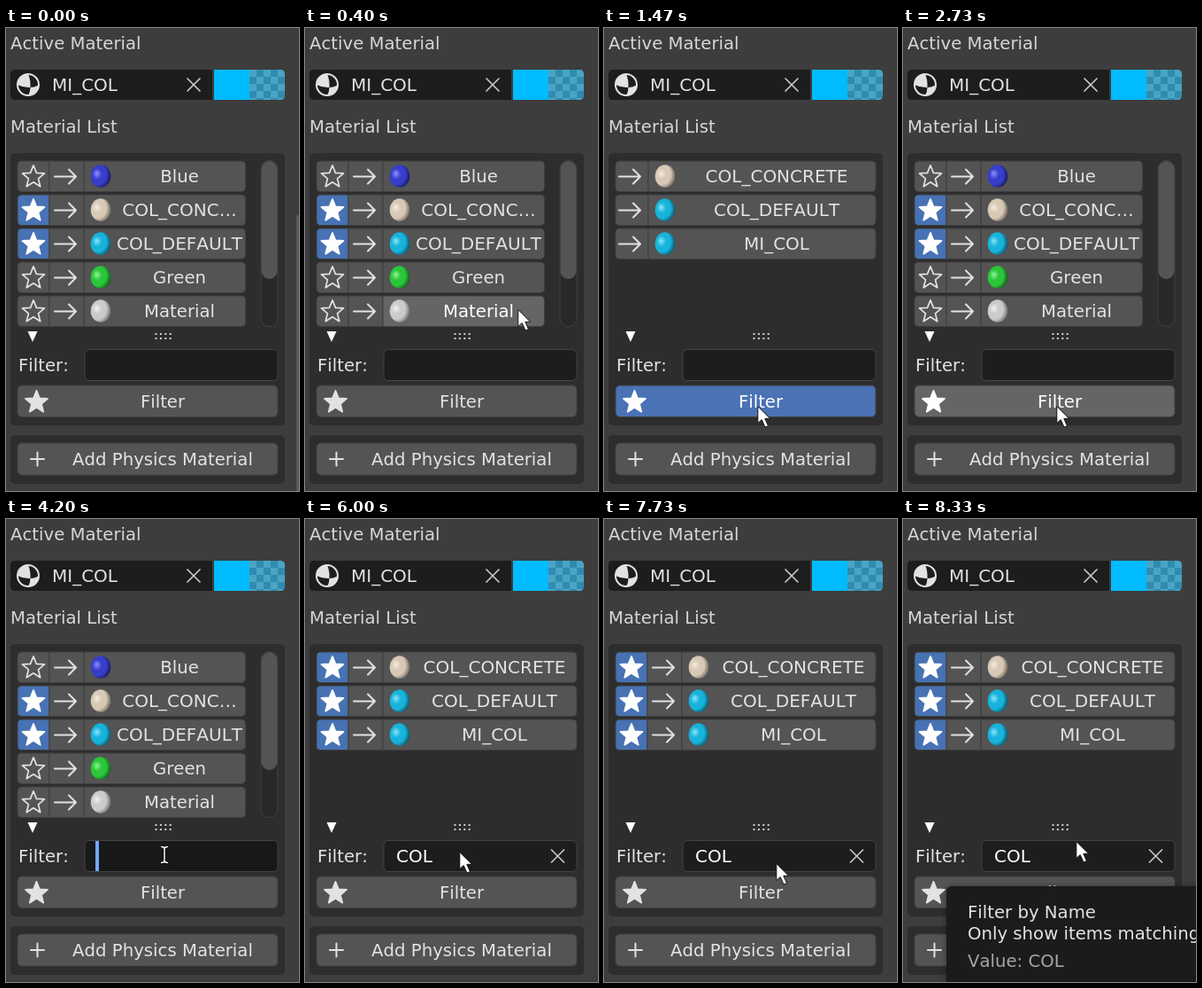
An HTML page that plays this animation: 331 px wide and 522 px high, repeating every 8.94 s.

```html
<!DOCTYPE html>
<html lang="en">
<head>
<meta charset="utf-8">
<title>Material list filter</title>
<style>
  html, body { margin: 0; width: 100%; height: 100%; overflow: hidden; background: #3d3d3d; }
  svg { display: block; width: 331px; height: 522px; }
  text { font-family: "DejaVu Sans", sans-serif; font-size: 19.7px; font-kerning: none; white-space: pre; }
  .caps { font-size: 20px; }
  .mid { text-anchor: middle; }
  .line { fill: none; stroke: #e2e2e2; stroke-width: 2; stroke-linecap: round; stroke-linejoin: round; }
</style>
</head>
<body>
<svg id="stage" viewBox="0 0 331 522"></svg>
<script>
const LOOP = 8940, FPS = 15;
const BUTTON = '#545454', HOVER = '#656565', BLUE = '#4772b3', FIELD = '#1d1d1d', PANEL = '#2d2d2d';
const EDGE = 'stroke="#3f3f3f"';

// name: highlight, body, shade
const balls = {
  blue: ['#8c92ff', '#383dcb', '#14164f'],
  cream: ['#f6ecdf', '#d8c9b6', '#675e53'],
  cyan: ['#8ae6fb', '#17b3da', '#0a4a5e'],
  green: ['#91f49a', '#2bc63a', '#0e5017'],
  grey: ['#f2f2f2', '#cbcbcb', '#636363']
};
const full = [
  ['Blue', 'blue'], ['COL_CONC…', 'cream', 1], ['COL_DEFAULT', 'cyan', 1],
  ['Green', 'green'], ['Material', 'grey']
];
const found = [['COL_CONCRETE', 'cream', 1], ['COL_DEFAULT', 'cyan', 1], ['MI_COL', 'cyan', 1]];

// pointer path: tick, x, y
const path = [
  [3, 318, 262], [4, 290, 285], [6, 240, 317], [8, 222, 345], [11, 198, 391], [13, 182, 414],
  [16, 173, 426], [50, 173, 426], [53, 173, 402], [55, 173, 402], [59, 174, 375],
  [101, 174, 375], [104, 178, 414], [106, 181, 434], [108, 184, 416], [110, 187, 388],
  [111, 188, 374], [112, 189, 380], [114, 191, 412], [115, 192, 420], [116, 194, 388], [117, 195, 363]
];

const rect = (x, y, w, h, fill, r = 0, extra = '') =>
  `<rect x="${x}" y="${y}" width="${w}" height="${h}" rx="${r}" fill="${fill}" ${extra}/>`;
const line = (d, extra = '') => `<path class="line" d="${d}" ${extra}/>`;
const shape = (d, fill, extra = '') => `<path d="${d}" fill="${fill}" ${extra}/>`;

function label(s, x, y, mid, fill = '#e2e2e2') {
  const caps = s === s.toUpperCase() ? 'caps' : '';
  return `<text class="${caps} ${mid ? 'mid' : ''}" x="${x}" y="${y}" fill="${fill}">${s}</text>`;
}

// Button part with rounding only on the chosen ends
function part(x, y, w, h, fill, left, right, extra = '') {
  const a = left ? 5 : 0, b = right ? 5 : 0;
  return shape(`M${x + a} ${y}H${x + w - b}q${b} 0 ${b} ${b}V${y + h - b}q0 ${b} ${-b} ${b}` +
    `H${x + a}q${-a} 0 ${-a} ${-a}V${y + a}q0 ${-a} ${a} ${-a}Z`, fill, extra);
}

function star(cx, cy, solid, fill = '#e2e2e2') {
  let d = '';
  for (let i = 0; i < 10; i++) {
    const r = i % 2 ? 5.8 : 13.2, a = i * Math.PI / 5 - Math.PI / 2;
    d += `${i ? 'L' : 'M'}${(cx + r * Math.cos(a)).toFixed(2)} ${(cy + 1 + r * Math.sin(a)).toFixed(2)}`;
  }
  return line(d + 'Z', `style="fill:${solid ? fill : 'none'};stroke:${fill};stroke-width:1.7"`);
}

const arrow = (cx, cy) => line(`M${cx - 12} ${cy}h24m-8 -8l8 8l-8 8`, 'stroke-width="1.8"');
const cross = (cx, cy) => line(`M${cx - 7} ${cy - 7}l14 14m0 -14l-14 14`, 'style="stroke:#c8c8c8;stroke-width:1.7"');
const ball = (cx, cy, c) => `<ellipse cx="${cx}" cy="${cy}" rx="11.3" ry="12.8" fill="url(#${c})"/>`;

const defs = '<defs>' + Object.entries(balls).map(([id, c]) =>
  `<radialGradient id="${id}" cx=".36" cy=".45" r=".68" fx=".3" fy=".38">` +
  [0, .35, .65, 1].map((o, i) => `<stop offset="${o}" stop-color="${c[[0, 1, 1, 2][i]]}"/>`).join('') +
  '</radialGradient>').join('') +
  '<pattern id="check" x="275" y="47" width="16" height="16" patternUnits="userSpaceOnUse">' +
  rect(0, 0, 16, 16, '#2f8cb0') + rect(0, 0, 8, 8, '#4ba4c4') + rect(8, 8, 8, 8, '#4ba4c4') +
  '</pattern><filter id="soft"><feGaussianBlur stdDeviation="3"/></filter></defs>';

function backdrop() {
  let dots = '';
  for (let i = 0; i < 8; i++) dots += rect(168.5 + i % 4 * 5.4, i < 4 ? 344 : 349, 2, 2, '#d0d0d0');
  return defs + rect(0, 0, 331, 522, '#3d3d3d') +
    label('Active Material', 5, 24, 0, '#d6d6d6') +
    part(5, 47, 228, 34, FIELD, 1, 0) +
    shape('M13 64Q20 67.5 27.5 67Q28 58 25 52A12 12 0 0 0 13 64ZM37 64Q33 67 27.5 67Q27.5 72 25 76A12 12 0 0 0 37 64Z', '#e2e2e2') +
    '<circle class="line" cx="25" cy="64" r="12"/>' +
    label('MI_COL', 52, 71) + cross(212, 64) +
    rect(235, 47, 40.5, 34, '#00bbff') + part(275, 47, 40, 34, 'url(#check)', 0, 1) +
    label('Material List', 5, 118, 0, '#d6d6d6') +
    rect(5, 141, 310, 307, PANEL, 5) + rect(5, 459, 310, 55, PANEL, 5) +
    shape('M24.5 342h11l-5.5 12Z', '#fff') + dots +
    label('Filter:', 14, 387) +
    rect(13, 468, 294, 36, BUTTON, 5, EDGE) + line('M28 486h15m-7.5 -7.5v15') +
    label('Add Physics Material', 177, 493, 1);
}

function list(rows, stars, right, p) {
  const x = stars ? 88 : 50, mid = stars ? (right < 300 ? 196 : 214) : 195;
  return rows.map(([name, color, fav], i) => {
    const y = 150 + i * 38, cy = y + 17;
    const over = p && p.x >= x && p.x <= right && p.y >= y && p.y < y + 35;
    const head = stars ? part(13, y, 36, 34.5, fav ? BLUE : BUTTON, 1, 0, EDGE) +
      star(31, cy, fav, fav ? '#fff' : '#e2e2e2') : '';
    const go = stars ? 49 : 13;
    return head + part(go, y, x - go, 34.5, BUTTON, !stars, 0, EDGE) + arrow(x - 21, cy + .5) +
      part(x, y, right - x, 34.5, over ? HOVER : BUTTON, 0, 1, EDGE) +
      ball(x + 19, cy, color) + label(name, mid, cy + 7, 1, over ? '#fff' : '#e2e2e2');
  }).join('');
}

const scroller = rect(288, 149.5, 19, 187, '#282828', 9, 'stroke="#414141"') +
  rect(288.5, 150, 18, 133, BUTTON, 9);

function pointerAt(n) {
  if (n < path[0][0]) return null;
  let i = path.findIndex(k => k[0] > n);
  if (i < 0) i = path.length;
  const a = path[i - 1], b = path[i] || a;
  const f = b === a ? 0 : (n - a[0]) / (b[0] - a[0]);
  return { x: a[1] + (b[1] - a[1]) * f, y: a[2] + (b[2] - a[2]) * f };
}

function pointer({ x, y }, editing) {
  if (editing) {
    const d = 'M175.5 369.5q3.5 0 3.5 2.5q0 -2.5 3.5 -2.5M179 372v13M175.5 387.5q3.5 0 3.5 -2.5q0 2.5 3.5 2.5';
    return line(d, 'style="stroke:#000;stroke-width:3"') + line(d, 'style="stroke:#fff;stroke-width:1.5"');
  }
  return shape('M0 0V19L4.4 15.1L8.2 23.6L11.7 22.1L8 13.8H13.8Z', '#fff',
    `transform="translate(${x + .8} ${y + .5})" stroke="#111" stroke-linejoin="round"`);
}

function field(n, editing) {
  const typed = (n >= 74) + (n >= 78) + (n >= 81);
  const caret = 101 + [0, 14, 29.7, 41][typed];
  return rect(89, 362.5, 218, 35, editing ? '#181818' : FIELD, 5, 'stroke="#454545"') +
    (typed ? label('COL'.slice(0, typed), 103, 387, 0, '#fff') + cross(285.5, 380) : '') +
    (editing ? rect(caret, 363, 4, 34, '#71a8ff') : '');
}

const tooltip = rect(49, 414, 300, 130, '#000', 6, 'opacity=".4" filter="url(#soft)"') +
  rect(49, 414, 300, 130, '#1b1b1b', 6) +
  label('Filter by Name', 73, 450) + label('Only show items matching this name', 73, 474) +
  label('Value: COL', 73, 505, 0, '#a6a6a6');

const base = backdrop();
const stage = document.getElementById('stage');

function scene(n) {
  const p = pointerAt(n);
  const editing = n >= 63 && n < 90;
  const favs = n >= 22 && n < 41, search = n >= 74;
  const over = p && p.y >= 401.5 && p.y < 439;
  const fill = favs ? '#4a72b5' : over ? HOVER : BUTTON;
  const ink = over ? '#fff' : '#e2e2e2';
  const thumb = Math.max(0, 1 - Math.max(0, n - 2) / 4);
  return base +
    rect(328, 211, 6, 320, '#5a5a5a', 2, `opacity="${thumb}"`) +
    (favs ? list(found, false, 307, p) : search ? list(found, true, 307, p) : list(full, true, 270.5, p) + scroller) +
    field(n, editing) +
    rect(13, 403, 294, 35.5, fill, 5, EDGE) + star(34.5, 421, true, ink) + label('Filter', 177, 428, 1, ink) +
    (n >= 125 ? tooltip : '') + (p ? pointer(p, editing) : '');
}

let start = null, shown = -1;
function frame(now) {
  if (start === null) start = now;
  const n = Math.floor((now - start) % LOOP * FPS / 1000 + .06);
  if (n !== shown) stage.innerHTML = scene(shown = n);
  requestAnimationFrame(frame);
}
stage.innerHTML = scene(0);
requestAnimationFrame(frame);
</script>
</body>
</html>
```
